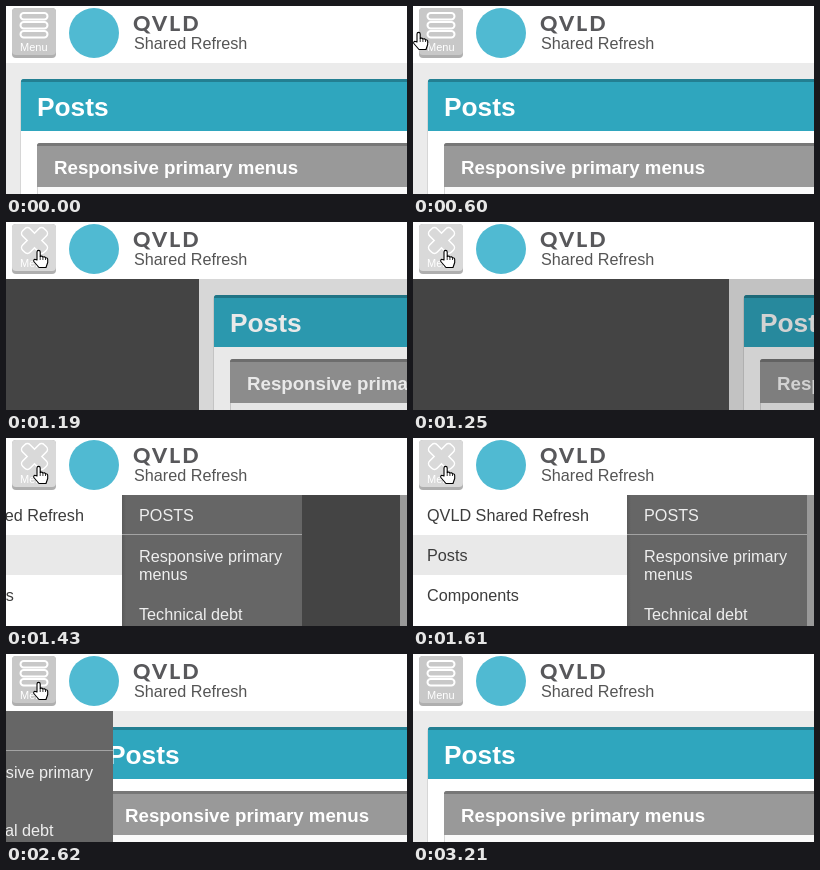
An HTML page for the animation above (4610 ms loop, 401x188 px).

```html
<!DOCTYPE html>
<html lang="en">
<head>
<meta charset="utf-8">
<title>Off-canvas menu</title>
<style>
  html, body { margin: 0; width: 100%; height: 100%; overflow: hidden; background: #444; }
  svg { display: block; width: 401px; height: 188px; font: 16.2px "Liberation Sans", Arial, sans-serif; }
  .bold { font-weight: bold; fill: #fff; }
  .bars rect { fill: none; stroke: #fff; stroke-width: 2; }
</style>
</head>
<body>
<svg viewBox="0 0 401 188">
  <defs>
    <g id="cross">
      <rect x="14" y="14" width="29" height="9" rx="3" transform="rotate(45 28.5 18.5)"/>
      <rect x="14" y="14" width="29" height="9" rx="3" transform="rotate(-45 28.5 18.5)"/>
    </g>
    <linearGradient id="edge">
      <stop stop-color="#000" stop-opacity=".12"/>
      <stop offset="1" stop-color="#000" stop-opacity="0"/>
    </linearGradient>
  </defs>
  <rect width="401" height="188" fill="#444"/>

  <g id="page">
    <rect y="57" width="420" height="131" fill="#ebebeb"/>
    <rect x="14.5" y="74" width="420" height="130" rx="3" fill="#fff" stroke="#d6d6d6"/>
    <path d="M15 125V76q0-3 3-3H420V125z" fill="#2fa6be"/>
    <path d="M15 76q0-3 3-3H420V76z" fill="#237f92"/>
    <text class="bold" x="31" y="110" font-size="26.3">Posts</text>
    <rect x="31.5" y="139" width="400" height="60" rx="3" fill="#fafafa" stroke="#d6d6d6"/>
    <path d="M31 181V140q0-3 3-3H420V181z" fill="#999"/>
    <path d="M31 140q0-3 3-3H420V140z" fill="#777"/>
    <text class="bold" x="48" y="168" font-size="18.7">Responsive primary menus</text>
    <rect id="shade" y="57" width="420" height="131"/>
  </g>

  <g id="menu">
    <rect y="57" width="214" height="131" fill="#fff"/>
    <rect y="97" width="214" height="40" fill="#e9e9e9"/>
    <g fill="#3c3c3c">
      <text x="14" y="83">QVLD Shared Refresh</text>
      <text x="14" y="123">Posts</text>
      <text x="14" y="163">Components</text>
    </g>
    <rect x="214" y="57" width="180" height="131" fill="#666"/>
    <rect x="214" y="57" width="4" height="131" fill="url(#edge)"/>
    <rect x="214" y="96" width="180" height="1" fill="#a3a3a3"/>
    <g fill="#eee">
      <text x="231" y="83">POSTS</text>
      <text x="231" y="124">Responsive primary</text>
      <text x="231" y="142">menus</text>
      <text x="231" y="182">Technical debt</text>
    </g>
  </g>

  <rect width="401" height="57" fill="#fff"/>
  <circle cx="88" cy="27" r="25" fill="#50bad2"/>
  <text x="127" y="25" fill="#58585b" style="font: 800 21.5px Lato, sans-serif; letter-spacing: 2px">QVLD</text>
  <text x="128" y="43" fill="#555">Shared Refresh</text>

  <g id="button">
    <rect id="lip" x="6" y="2" width="44" height="50" rx="4"/>
    <rect id="face" x="6" y="2" width="44" height="47" rx="4"/>
    <g id="burger" class="bars">
      <rect x="14.5" y="7" width="27" height="6.5" rx="3.2"/>
      <rect x="14.5" y="16" width="27" height="6.5" rx="3.2"/>
      <rect x="14.5" y="25" width="27" height="6.5" rx="3.2"/>
    </g>
    <g id="close">
      <use href="#cross" stroke="#fff" stroke-width="3"/>
      <use href="#cross" fill="#d9d9d9"/>
    </g>
    <text x="14" y="45" font-size="11" fill="#fff">Menu</text>
  </g>

  <g id="cursor">
    <circle id="ring" cx="33.5" cy="26" r="10" fill="none" stroke="#222"/>
    <g transform="translate(-1 0)" stroke="#000">
      <path d="M32 38V30a1.6 1.6 0 0 1 3.2 0V34.5q2-1 2.7.6q2-.8 2.6.7q2.2-.3 2.2 1.7V40.5L41 45.5H34L28.8 39.5q-.5-2.5 1.6-2z" fill="#fff" stroke-width="1.1" stroke-linejoin="round"/>
      <path d="M35.2 34.5V38M37.9 35.1V38M40.5 35.8V38" stroke-width=".8"/>
    </g>
  </g>
</svg>
<script>
const LOOP = 4610, CLICK_OPEN = 1130, CLICK_CLOSE = 2500, STEP = 60, MENU_WIDTH = 394;
const $ = id => document.getElementById(id);
const set = (id, name, value) => $(id).setAttribute(name, value);
const show = (id, on) => set(id, "display", on ? "inline" : "none");
const move = (id, x, y = 0) => set(id, "transform", `translate(${Math.round(x)} ${Math.round(y)})`);

// Stepped ease-out from 0 to 1
function ease(t, start, duration, steps, power) {
  const x = Math.floor((t - start) / duration * steps) / steps;
  return 1 - (1 - Math.min(1, Math.max(0, x))) ** power;
}

function draw(t) {
  const active = t >= CLICK_OPEN + STEP && t < CLICK_CLOSE + STEP;
  const pressed = [CLICK_OPEN, CLICK_CLOSE].some(c => t >= c && t < c + STEP);

  const opened = ease(t, CLICK_OPEN, 240, 4, 2.34);
  const closed = ease(t, CLICK_CLOSE, 230, 4, 2.47);
  move("page", MENU_WIDTH * (opened - closed));
  set("shade", "opacity", active ? 0.35 * ease(t, CLICK_OPEN, 240, 4, 1) : 0);

  const slideIn = ease(t, 1250, 360, 6, 2);
  const slideOut = ease(t, CLICK_CLOSE, 230, 4, 1.88);
  move("menu", MENU_WIDTH * (slideIn - 1 - slideOut));

  const face = active ? "#d9d9d9" : "#c8c8c8";
  show("close", active);
  show("burger", !active);
  set("face", "fill", face);
  set("lip", "fill", pressed ? face : "#afafaf");
  move("button", 0, pressed ? 2 : 0);

  show("cursor", t >= 600 && t < 3210);
  show("ring", pressed);
  const away = 1 - ease(t, 600, 290, 5, 1.6);
  move("cursor", t >= 3150 ? -22 : -27 * away, -2 * away);
}

function tick() {
  draw(performance.now() % LOOP);
  requestAnimationFrame(tick);
}
tick();
</script>
</body>
</html>
```
